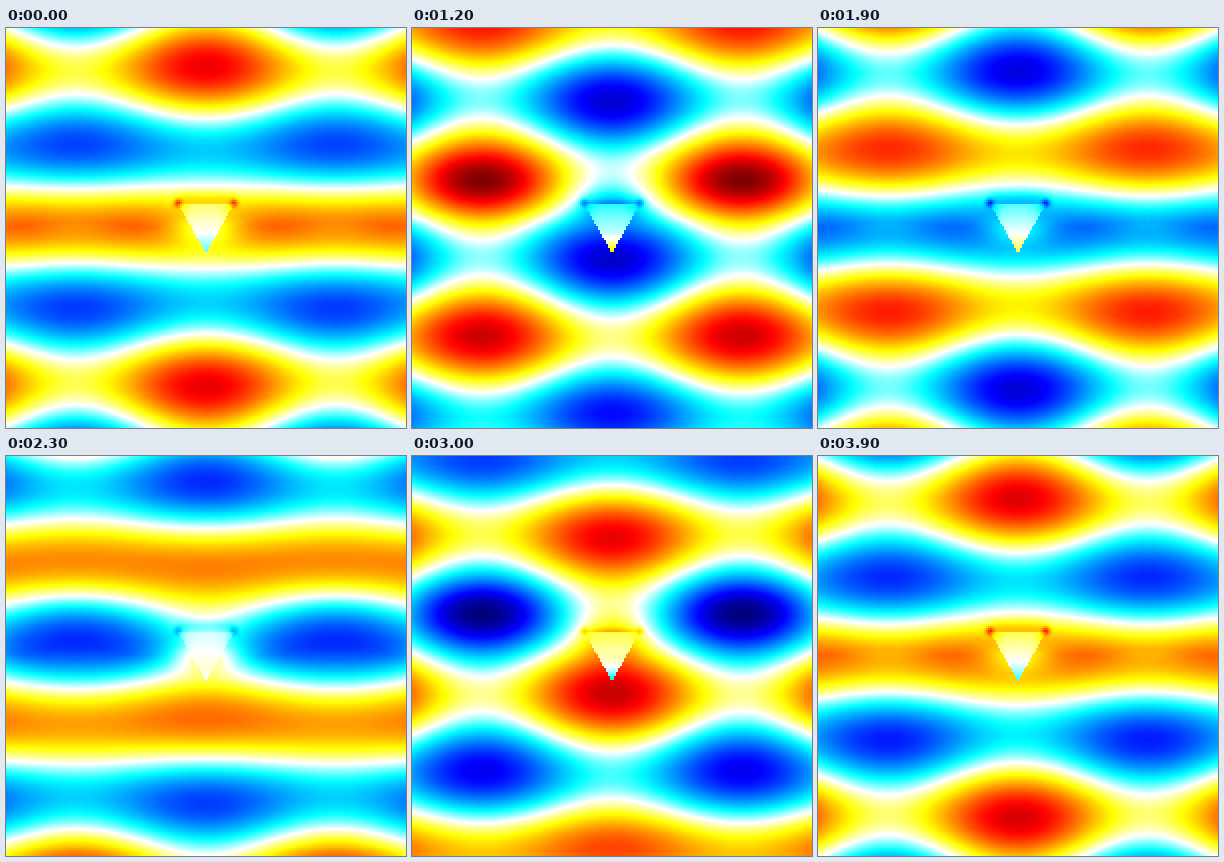
These frames come from a looping animation (400x400 px, 4 s). A matplotlib script:

```python
import numpy as np
import matplotlib.pyplot as plt
from matplotlib.animation import FuncAnimation
from matplotlib.colors import LinearSegmentedColormap

SIZE, CELLS, FRAMES = 400, 200, 40
MID_X, MID_Y = 200, 198.5

# Jet with a white centre: yellow and red sit at 1/4 and 3/4 of full scale.
wave_map = LinearSegmentedColormap.from_list(
    "wave",
    [(0, (0, 0, 0.5)), (0.125, (0, 0, 1)), (0.375, (0, 1, 1)), (0.5, (1, 1, 1)),
     (0.625, (1, 1, 0)), (0.875, (1, 0, 0)), (1, (0.5, 0, 0))],
    N=256,
)


def bump(x, y, cx, cy, sx, sy):
    return np.exp(-(((x - cx) / sx) ** 2) - ((y - cy) / sy) ** 2)


def build_field():
    """Complex amplitude of the wave around the wedge."""
    axis = (np.arange(CELLS) + 0.5) * SIZE / CELLS
    x, y = np.meshgrid(axis, axis)
    theta = 2 * np.pi * (x - MID_X) / 260

    # Upward plane wave plus the first diffraction order on both sides.
    incident = 0.48 * np.exp(1j * 2 * np.pi / 158 * (y - MID_Y))
    order = 0.38 * np.exp(1j * (1.72 - 0.0068 * np.abs(y - 195)))
    order = order + 0.15j * np.exp(-(((y - 155) / 26) ** 2))
    outside = incident + order * np.cos(theta)

    # Evanescent second order.
    decay = np.exp(-0.06 * np.abs(y - MID_Y))
    outside = outside - 0.07 * decay * np.cos(2 * theta)

    # Near field of the wedge: body, top edge and two corners.
    outside = outside - 0.23 * bump(x, y, MID_X, 203, 32, 16)
    outside = outside + 0.25j * bump(x, y, MID_X, 180, 36, 22)
    along = np.exp(-(((x - MID_X) / 29) ** 8))
    outside = outside + 0.09 * along * np.exp(-(((y - 171) / 7) ** 2))
    outside = outside + 0.10j * along * np.exp(-(((y - 175) / 3) ** 2))
    corners = bump(x, y, 172, 175, 4, 4) + bump(x, y, 228, 175, 4, 4)
    outside = outside + (0.33 + 0.18j) * corners

    # Inside the wedge the field is weak and flips sign towards the tip.
    rows = [177, 190, 205, 212, 223]
    real = np.interp(y, rows, [0.14, 0.07, 0.0, -0.06, -0.14])
    imag = np.interp(y, rows, [0.18, 0.11, 0.06, -0.02, -0.26])
    spread = ((x - MID_X) / 28) ** 4
    inside = real + 1j * imag + (0.22 + 0.06j) * spread + (0.2 + 0.12j) * corners

    half_width = 28 * (225 - y) / 49
    wedge = (y > 176) & (np.abs(x - MID_X) < half_width)
    return np.where(wedge, inside, outside)


field = build_field()


def snapshot(i):
    return (field * np.exp(2j * np.pi * i / FRAMES)).real


fig = plt.figure(figsize=(4, 4), dpi=100)
ax = fig.add_axes([0, 0, 1, 1])
ax.axis("off")
image = ax.imshow(snapshot(0), cmap=wave_map, vmin=-1, vmax=1,
                  interpolation="nearest", aspect="auto")


def update(i):
    image.set_data(snapshot(i))
    return [image]


anim = FuncAnimation(fig, update, frames=FRAMES, interval=100,
                     repeat=True, repeat_delay=0)
plt.show()
```
